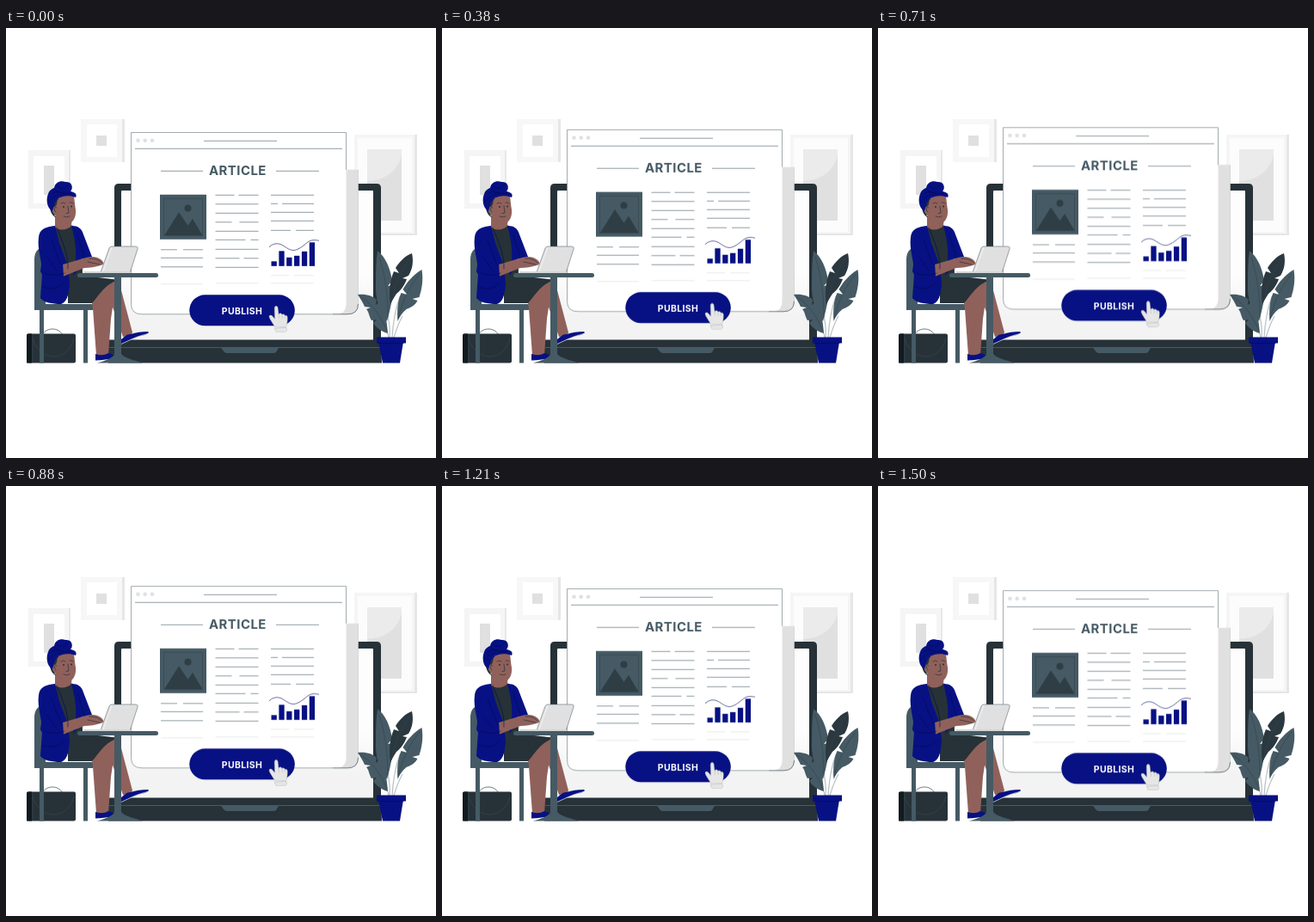
Animation, 500 px wide and 500 px high, one loop 1540 ms. Source, as an HTML page:

```html
<!DOCTYPE html>
<html lang="en">
<head>
<meta charset="utf-8">
<title>Publish article</title>
<style>
html, body { margin: 0; width: 100%; height: 100%; overflow: hidden; background: #fff; }
svg { display: block; width: 100vw; height: 100vh; }
.page { animation: float 1540ms -40ms infinite; }
@keyframes float {
  0%, 100% { transform: translateY(0); animation-timing-function: cubic-bezier(.33, .17, .67, .83); }
  50% { transform: translateY(-6px); animation-timing-function: cubic-bezier(.33, .17, .67, .83); }
}
text { font-family: Inter, "Open Sans", sans-serif; font-weight: 700; text-anchor: middle; }
.dark { fill: #263238; }
.slate { fill: #455a64; }
.blue { fill: #071183; }
.skin { fill: #90615b; }
.pale { fill: #e0e0e0; }
.hair { fill: none; stroke: #455a64; stroke-width: .6; }
.ink { fill: none; stroke: #263238; stroke-width: .7; stroke-linecap: round; }
.vein { fill: none; stroke: #33444c; stroke-width: .6; }
.fold { fill: none; stroke: #030a55; stroke-width: .6; stroke-linecap: round; }
</style>
</head>
<body>
<svg viewBox="0 0 500 500">
  <defs>
    <linearGradient id="screen" x2="0" y2="1">
      <stop offset=".55" stop-color="#fdfdfd"/>
      <stop offset=".85" stop-color="#f3f3f3"/>
    </linearGradient>
  </defs>

  <g id="frames">
    <path fill="#f5f5f5" d="M26 142h47v68H26z"/>
    <path fill="#e8e8e8" d="M73 142h2v68h-2z"/>
    <path fill="#fff" d="M32 149h36v55H32z"/>
    <path class="pale" d="M44 160h12v34H44z"/>
    <path fill="#f7f7f7" d="M87 106h48v50H87z"/>
    <path fill="#e6e6e6" d="M135 106h3v50h-3z"/>
    <path fill="#fff" d="M94 112h35v38H94z"/>
    <path class="pale" d="M105 125h12v12h-12z"/>
    <path fill="#f5f5f5" d="M405 124h70v117h-70z"/>
    <path fill="#e6e6e6" d="M475 124h3v117h-73v-2h70z"/>
    <path fill="#fcfcfc" d="M409 128h63v109h-63z"/>
    <path class="pale" d="M420 141h40v83h-40z"/>
    <path fill="#ebebeb" d="M420 141h40v6c-3 17-17 30-40 31z"/>
  </g>

  <g id="laptop">
    <path class="dark" d="M126 364V186q0-5 5-5h300q5 0 5 5v178z"/>
    <path fill="url(#screen)" d="M134 190q0-1 1-1h291q1 0 1 1v173H134z"/>
    <path class="dark" d="M119 362.600h317l1 26.900H119z"/>
    <path d="M120 371.500h316" fill="none" stroke="#66757d" stroke-width=".6"/>
    <path class="slate" d="M250 372h67l-3 5q-1 1-3 1h-54q-2 0-3-1z"/>
  </g>

  <g class="page">
    <path fill="#e0e0e0" d="M395 165h14.700v156q0 12-13 12H380z"/>
    <path fill="#fff" d="M145.500 121.700h250V322q0 8-8 11H158q-12.500 0-12.500-12z"/>
    <path d="M380 333h17q12.500 0 12.500-12" fill="none" stroke="#37474f" stroke-width=".7"/>
    <path d="M409.500 321V165" stroke="#b5bcbf" stroke-width=".4"/>
    <path d="M395.500 165V121.700h-250V321q0 12 12.500 12h222" fill="none" stroke="#7b878d" stroke-width=".7"/>
    <g class="pale">
      <circle cx="153.500" cy="131" r="2.300"/><circle cx="161.700" cy="131" r="2.300"/><circle cx="170" cy="131" r="2.300"/>
    </g>
    <path class="hair" d="M230 131.500h85M150 140.500h241M180 166.500h49M314 166.500h50"/>
    <text class="slate" x="269.400" y="170.800" font-size="14.900" letter-spacing=".5">ARTICLE</text>

    <path class="slate" d="M179 194h54v52h-54z"/>
    <path class="vein" d="M183.500 198.500h45v43h-45z"/>
    <g fill="#2f3e45">
      <path d="M184 241.500l17-27 10.500 15.500 5.500-8 11.500 19.500z"/>
      <circle cx="211.500" cy="209.700" r="4"/>
    </g>

    <g id="copy" class="hair"></g>

    <g id="bars" class="blue"></g>
    <path d="M306 255c5-5 11-5 16-2 6 4 11 8 18 4 8-4 10-9 16-10 3-.5 6 0 8 .5" fill="none" stroke="#17206f" stroke-width=".65"/>

    <rect class="blue" x="213.300" y="310.500" width="122.500" height="36" rx="18"/>
    <text x="274.500" y="333.200" font-size="10.500" letter-spacing=".35" fill="#fff">PUBLISH</text>

    <g fill="#e6e6e6" stroke="#a5abae" stroke-width=".4" stroke-linejoin="round">
      <path d="M312.500 348c-1-3-6-9-6.500-12-.2-2 2.500-2.500 4-.5l2.500 3-.3-12.500c0-3.500 3.800-3.500 4 0l.8 7c1.500-1.700 3.500-1 4 .5 1.500-1 3-.2 3.300 1 2-.5 3 .5 3 2.500 0 4-.3 7-1.600 11z"/>
      <path d="M312 349.500l14-1 .6 3.500-2 1.600h-10.500z"/>
      <path fill="none" d="M317 333l.5 5M321 334l.3 4M324.300 335l.1 3"/>
    </g>
  </g>

  <g id="bag">
    <path d="M43 356c4-8 18-8 22 0" fill="none" stroke="#455a64" stroke-width=".8"/>
    <rect class="dark" x="24" y="355.500" width="57" height="34" rx="2"/>
    <path d="M31 356v32M31 361c8 28 41 28 48 0" fill="none" stroke="#3c4b53" stroke-width=".6"/>
    <path fill="#111a1e" d="M24 357.500q0-2 2-2h4v34h-6z"/>
  </g>

  <g id="chair" class="slate">
    <path d="M33 328V270c0-7 2-12 7-14l6 1v64h55v7z"/>
    <path d="M39 327h5v62.500h-5zM90 327h5v62.500h-5z"/>
  </g>

  <g id="woman">
    <path class="skin" d="M108 298l19-6q5 2 7 13l13 49-2 4-9 1-16-46z"/>
    <path class="blue" d="M134 362c4-3 6-6 11-6 6-2 13-3 20-3 2 1 0 3-4 4-10 2-17 6-27 10z"/>
    <path d="M134 367.500c11-5 18-9 31-12" stroke="#eee" stroke-width=".7" fill="none"/>
    <path class="skin" d="M99 314l23-22q5-1 6 6l-6 40-3 43h-14l-4-55z"/>
    <path class="blue" d="M104 379q9 3 15-1l8 3v3.500c-7 0-15 2-23 2z"/>
    <path class="dark" d="M72 288c18 0 35 2 48 3.500 9 1.500 10 1 2 5.500-9 5-14 14-22 23H72z"/>
    <path class="dark" d="M55 231c8-3 15-3 23-1 8 14 11 33 11 58l-15 17-14-27z"/>
    <path class="skin" d="M57 215l20 4-1 11c-4 5-14 6-19 2z"/>
    <path class="blue" d="M57 230c-11 1-18 4-19 13-2 15 4 26 4 43l-2 28c4 5 13 7 24 7 6-2 9-9 10-24l-2-20-10-27z"/>
    <path class="blue" d="M76 230c8 0 12 3 14 10l10 26-8 4-4-2c-1 5-3 13-10 20 6-23 3-40-2-58z"/>
    <path class="skin" d="M66 275l27-8c7-2 13-1 17 2 4 3 5 6 0 7-6 2-13 3-19 3l-25 10z"/>
    <path class="blue" d="M46 238c11 0 15 14 20 35l1 16c-11 5-24 3-27-6z"/>
    <path class="fold" d="M53 247c4 12 8 20 12 31M45 285c8 3 16 3 23 0M59 232c6 15 14 32 13 48M43 301c8 4 19 2 25-5M83 241l8 25M48 267l11 15"/>
    <path class="ink" d="M95 272l14 3M97 268c7 0 10 1 14 5M80 294l20 3" stroke-width=".5"/>

    <path class="dark" d="M52 199c-2 9-1 17 5 21l7-6 4-17z"/>
    <path class="skin" d="M60 200c5-7 14-7 19-4 1 6 1 10 2 15 1 10-4 17-11 17-6 0-11-5-13-11-4-2-4-9-1-9 3 0 3-4 4-8z"/>
    <path class="blue" d="M54 213c-6-3-8-13-5-20 1-4 4-6 7-7 1-7 8-9 13-7 7-1 10 6 6 11 5 1 8 3 6 7-7-3-15-2-20 1-5 4-5 9-7 15z"/>
    <path class="fold" d="M55 187c6 4 11 6 20 5M59 184c6 4 11 3 14-3M50 202c6-8 14-10 26-9M53 193c4-3 8-3 13-1" stroke="#727cc5"/>
    <path class="ink" d="M64 204q3-2 5 0M74 203q2-1 4 1M72 207l1 8-3 .5M67 219q4 2 7 0M59 209c-3-2-4 2-1 5"/>
    <circle class="dark" cx="67" cy="208" r="1"/><circle class="dark" cx="76" cy="207.500" r="1"/>
    <circle cx="57" cy="218" r=".8" fill="#c8c8c8"/>
  </g>

  <g id="table">
    <path class="slate" d="M126 289h8v90c4 5 14 7 25 10.500h-53c10-3 17-5 20-10z"/>
    <rect class="slate" x="83" y="285" width="94" height="5" rx="2.500"/>
    <path class="pale" stroke="#5d6b72" stroke-width=".6" d="M110 284l10-28q1-2 3-2h27q4 0 3 3l-8 25q-1 2-3 2z"/>
    <path fill="#d5d5d5" d="M91 283h54v2H91z"/>
    <path d="M113 283l10-28" stroke="#fff" stroke-width=".6"/>
  </g>

  <g id="plant">
    <g fill="none" stroke="#b9c0c3" stroke-width="1.200">
      <path d="M446 360c1-12-1-22-3-30M449 360c1-18 4-34 9-48M451 360c3-10 6-18 10-25M445 360c-1-7-4-12-8-17"/>
    </g>
    <path class="slate" d="M432 259c9 7 15 20 17 35l-5 6 5-1c1 15-2 28-6 42-9-12-14-27-13-44 0-14 0-26 2-38z"/>
    <path fill="#2b383f" d="M472 262c2 9 1 18-4 26l-7 3 5 1c-3 8-7 13-12 17-3 5-6 9-7 13-2-14-1-28 4-39l6 2-4-6c5-8 11-14 19-17z"/>
    <path class="slate" d="M483.500 281c2 12 0 23-3 32l-8 2 6 2c-3 6-8 8-13 10-5 4-8 9-10 14-1-13 0-24 4-33l7 2-5-6c5-9 12-17 22-23z"/>
    <path class="slate" d="M409 310c9-1 17 1 22 6l-1 6 4-3c7 9 9 22 10 36-7-2-13-6-17-12l4-4-6 1c-3-5-3-10-6-13l5-2-7-1c-2-5-5-9-8-14z"/>
    <path class="vein" d="M434 266c7 23 10 44 10 70M481 286c-13 16-20 32-25 52M470 267c-11 16-18 32-22 52M412 312c16 11 24 24 31 40"/>
    <path class="blue" d="M433 365h29l-4 24.500h-20z"/>
    <path class="blue" d="M431 359.500h34v7h-34z"/>
    <path class="fold" d="M433 366.500h29"/>
  </g>
</svg>
<script>
const draw = (id, tag, attrs) => {
  const el = document.createElementNS("http://www.w3.org/2000/svg", tag);
  for (const key in attrs) el.setAttribute(key, attrs[key]);
  document.getElementById(id).append(el);
};

// y, optional gap start and end, optional opacity
const columns = [
  { x: 180, end: 229, rows: [[258, 19, 26], [267.5], [278], [298, 0, 0, .2]] },
  { x: 243.5, end: 293.5, rows: [[194.5, 22, 27], [205], [215.5], [226, 19, 28], [236.5],
    [246.5, 35, 41], [257.5], [268, 28, 33], [278.5], [297, 0, 0, .2]] },
  { x: 308, end: 358, rows: [[194.5], [204.5, 8, 13], [214.5], [224.5], [235.5, 23, 29],
    [288, 21, 27, .2], [297, 0, 0, .2]] }
];
for (const { x, end, rows } of columns)
  for (const [y, from, to, opacity = 1] of rows) {
    const d = from ? `M${x} ${y}h${from}M${x + to} ${y}H${end}` : `M${x} ${y}H${end}`;
    draw("copy", "path", { d, opacity });
  }

[5.5, 17.5, 10, 12, 17, 27.5].forEach((height, i) =>
  draw("bars", "rect", { x: 308.5 + i * 8.85, y: 277 - height, width: 6.3, height }));
</script>
</body>
</html>
```
